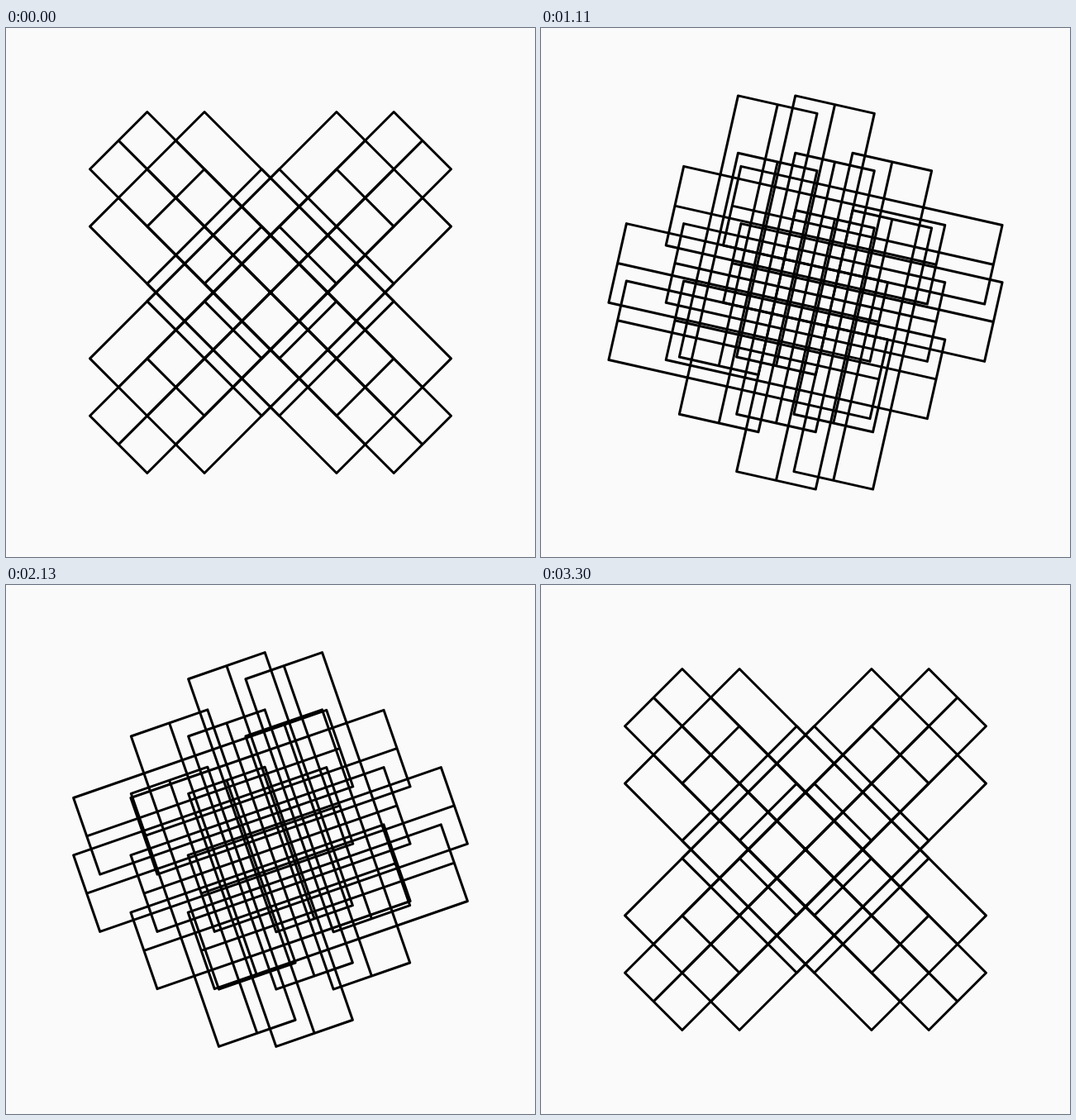
An HTML page with a canvas that plays this animation: 640 px wide and 640 px high, repeating every 3600 ms.

```html
<!DOCTYPE html>
<html>
<head>
<meta charset="utf-8">
<title>Turning bars</title>
<style>
  html, body { margin: 0; height: 100%; overflow: hidden; background: #fafafa; }
  canvas { display: block; }
</style>
</head>
<body>
<canvas width="640" height="640"></canvas>
<script>
const ctx = document.querySelector('canvas').getContext('2d');
const LENGTH = 324, WIDTH = 98, GAP = WIDTH / Math.SQRT2;
const LOOP = 3600, PHASE = 900, TURN = 600, STEP = 30;

const smooth = p => p * p * (3 - 2 * p);

function bar(x, y, angle) {
  ctx.save();
  ctx.translate(320 + x * GAP, 320 + y * GAP);
  ctx.rotate(angle);
  ctx.beginPath();
  ctx.rect(-LENGTH / 2, -WIDTH / 2, LENGTH, WIDTH);
  ctx.moveTo(-LENGTH / 2, 0);
  ctx.lineTo(LENGTH / 2, 0);
  ctx.stroke();
  ctx.restore();
}

function draw(time) {
  const t = Math.floor(time % LOOP / STEP) * STEP;
  const turns = Math.floor(t / PHASE) + smooth(Math.min(1, t % PHASE / TURN));
  const angle = (1 + turns) * Math.PI / 4;

  ctx.fillStyle = '#fafafa';
  ctx.fillRect(0, 0, 640, 640);
  ctx.strokeStyle = '#000';
  ctx.lineWidth = 3;
  ctx.lineJoin = 'round';

  // Two mirrored hexagonal clusters of seven bars, at right angles to each other
  for (let x = -1; x <= 1; x++) {
    for (let y = -1; y <= 1; y++) {
      if (x * y >= 0) bar(x, y, angle);
      if (x * y <= 0) bar(x, y, angle + Math.PI / 2);
    }
  }
}

const start = performance.now();
function tick() {
  draw(performance.now() - start);
  requestAnimationFrame(tick);
}
tick();
</script>
</body>
</html>
```
